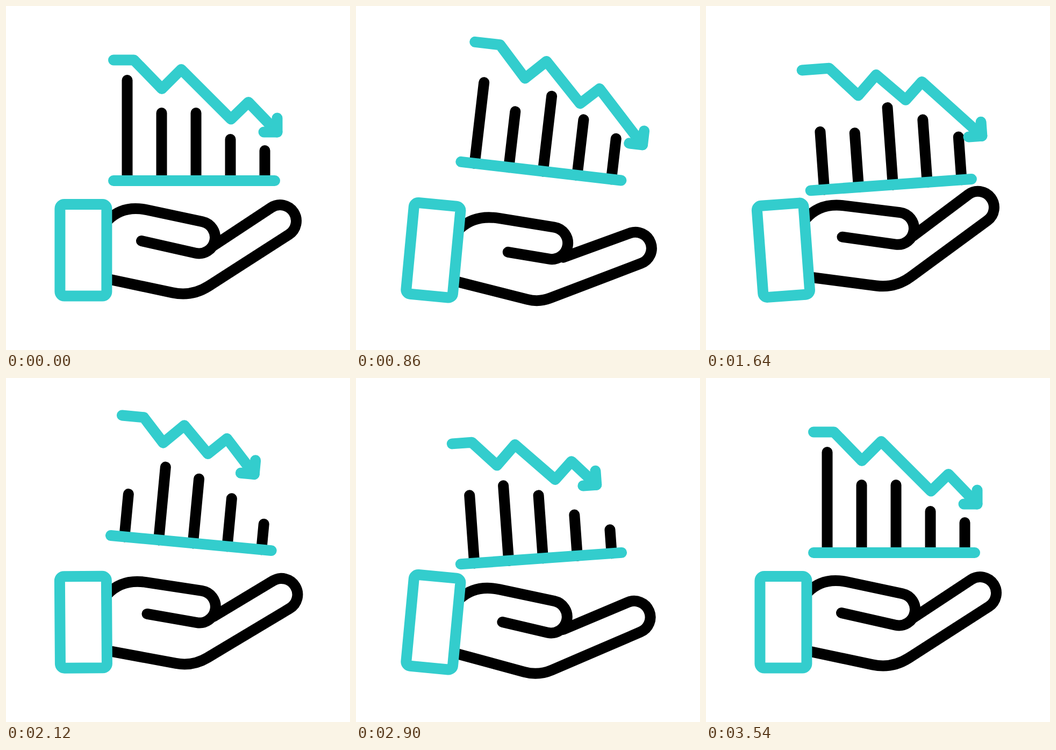
An HTML page for the animation above (3600 ms loop, 640 by 640 pixels).

```html
<!DOCTYPE html>
<html>
<head>
<meta charset="utf-8">
<style>
  html, body { margin: 0; height: 100%; overflow: hidden; background: #fff; }
  svg { display: block; width: 100vw; height: 100vh; }
  path, rect { fill: none; stroke: #000; stroke-width: 20; stroke-linecap: round; stroke-linejoin: round; }
  .teal { stroke: #33cdcd; }
  #cuff { fill: #fff; }
</style>
</head>
<body>
<svg viewBox="0 0 640 640">
  <g id="chart">
    <path id="bars"/>
    <path class="teal" d="M-150 0H150"/>
    <path class="teal" id="trend"/>
    <path class="teal" id="head"/>
  </g>
  <g id="arm">
    <path id="hand"/>
    <rect class="teal" id="cuff" x="100.4" y="369" width="87" height="170.5" rx="8"/>
  </g>
</svg>
<script>
const LOOP = 3600, START = 220, END = 3440;
const $ = id => document.getElementById(id);
const ramp = (t, a, b) => Math.min(1, Math.max(0, (t - a) / (b - a)));
const tent = (t, a, peak, b) => Math.min(ramp(t, a, peak), 1 - ramp(t, peak, b));
const ease = u => (1 - Math.cos(Math.PI * u)) / 2;

// Swing from rest through evenly spaced extremes and back to rest
function swing(t, first, step, extremes) {
  let value = 0, from = START;
  [...extremes, 0].forEach((next, i) => {
    const to = i < extremes.length ? first + i * step : END;
    value += (next - value) * ease(ramp(t, from, to));
    from = to;
  });
  return value;
}

// Bar heights: at rest, then the change in each of two poses
const BARS = [[187, -67, -121], [126, -40.5, 28], [126, 28, -17.5], [77, 51.5, -1], [56, 38, -24]];

// Rigid pieces of the trend line: points at rest and their shift in each pose
const TREND = [
  { points: [[-112, -224.5]], first: [17, 0], second: [-2.5, 0] },
  { points: [[-60, -171], [-24, -207]], first: [19.7, 5.6], second: [-19, -15] },
  { points: [[68.5, -114.5], [101, -146]], first: [-20.2, -35.5], second: [-64, -60] },
  { points: [[154.5, -90.5]], first: [51.5, 38], second: [-84.5, -77.5] }
];

function drawChart(t) {
  const x = 350 - 5.7 * swing(t, 900, 1940, [1, 1]);
  const y = 325 + swing(t, 830, 665, [-18, 11, -18.2, 11]);
  const tilt = swing(t, 980, 620, [7.05, -4.2, 6, -4.2]);
  $('chart').setAttribute('transform', `translate(${x} ${y}) rotate(${tilt})`);

  const w1 = tent(t, START, 1430, 2360), w2 = tent(t, 1430, 2360, END);
  const pose = (rest, first, second) => rest + w1 * first + w2 * second;

  $('bars').setAttribute('d', BARS.map((h, i) => `M${64 * i - 124.5} 0V${-pose(...h)}`).join(''));

  const line = TREND.flatMap(({ points, first, second }) =>
    points.map(p => p.map((v, i) => pose(v, first[i], second[i]))));
  const [tipX, tipY] = line.pop();
  const over = 62 * tent(t, 2920, 3450, 3540);
  line.push([tipX + over, tipY + over]);
  $('trend').setAttribute('d', `M-150 -224.5L${line.join(' ')}`);
  $('head').setAttribute('d', `M${tipX - 25} ${tipY}h25v-26`);
}

// Point on a circle, measured clockwise from the top
function rim([cx, cy], deg) {
  const a = deg * Math.PI / 180;
  return [cx + 30 * Math.sin(a), cy - 30 * Math.cos(a)];
}

function toward([x, y], [x2, y2], distance) {
  const k = distance / Math.hypot(x2 - x, y2 - y);
  return [x + (x2 - x) * k, y + (y2 - y) * k];
}

function drawArm(t) {
  const angle = swing(t, 972, 812, [5.65, -5, 7.5]);
  const flat = swing(t, 972, 812, [1.04, 0.02, 0.9]);
  $('arm').setAttribute('transform', `rotate(${angle} 144 454)`);

  const at = (x, y, dx, dy) => [x + dx * flat, y + dy * flat];
  const wrist = [190, 508];
  const back = at(218, 370, -3, 11);
  const thumb = at(359, 430.5, 3, -10), thumbAngle = 12.2 - 8.5 * flat;
  const finger = at(510, 400, 8, 16), fingerAngle = 33 - 7.6 * flat;
  const heel = at(346, 541, 2.6, -8.5), heelRound = 37 - 15 * flat;
  const thumbTop = rim(thumb, thumbAngle);
  const fingerBase = rim(finger, 180 - fingerAngle);

  $('hand').setAttribute('d', `
    M${at(190, 398, 0, 11)} Q${back} ${toward(back, thumbTop, 45)}
    L${thumbTop} A30 30 0 0 1 ${rim(thumb, thumbAngle + 180)} L${at(252, 437, 31, 8)}
    M${at(386, 446, 0, -1)} L${rim(finger, -fingerAngle)} A30 30 0 0 1 ${fingerBase}
    L${toward(heel, fingerBase, heelRound)} Q${heel} ${toward(heel, wrist, heelRound)} L${wrist}`);
}

function frame() {
  const t = performance.now() % LOOP;
  drawChart(t);
  drawArm(t);
  requestAnimationFrame(frame);
}
frame();
</script>
</body>
</html>
```
